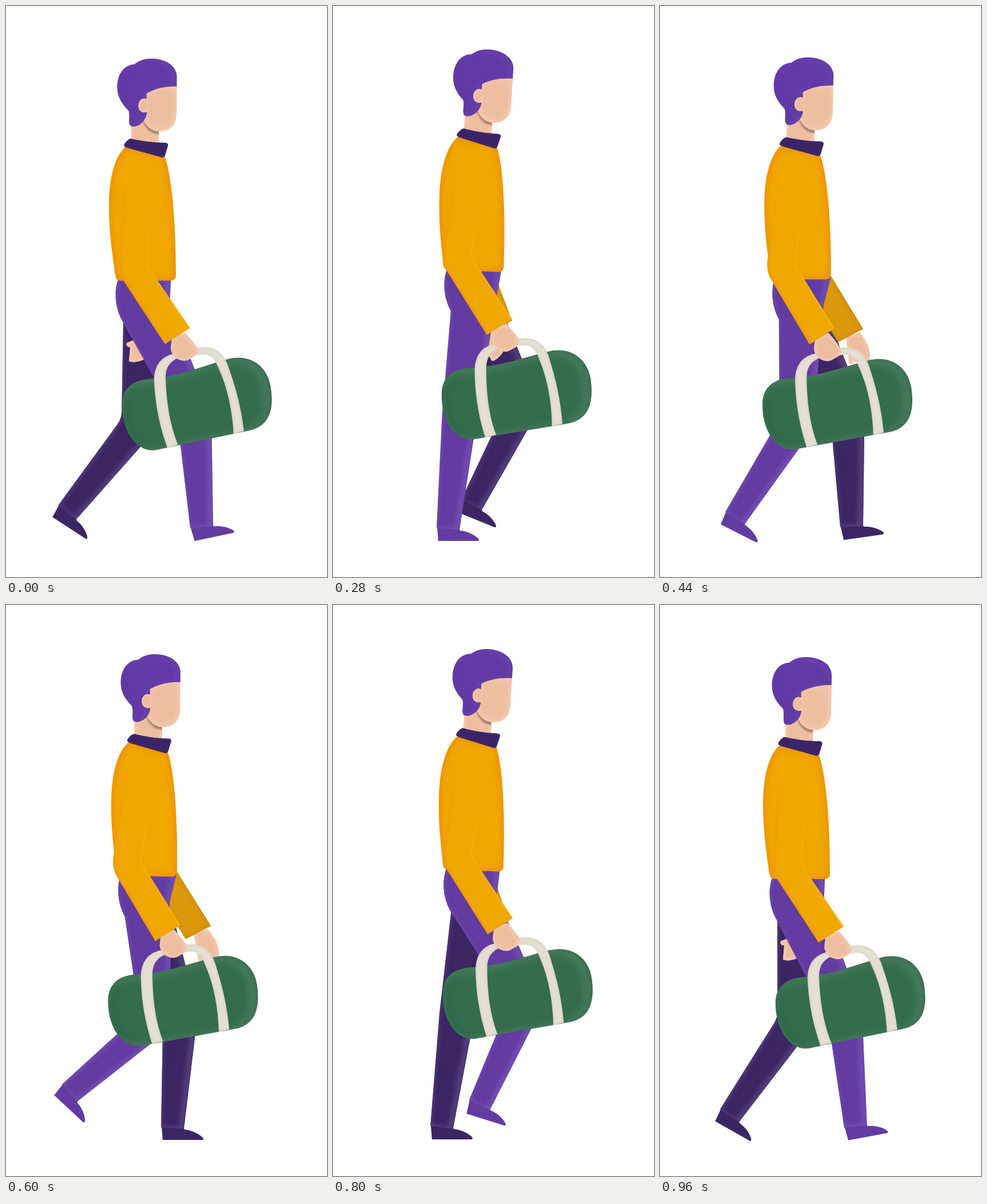
These frames come from a looping animation (561 px wide and 998 px high, 1000 ms). An HTML page with a canvas:

```html
<!DOCTYPE html>
<html lang="en">
<head>
<meta charset="utf-8">
<title>Walk cycle</title>
<style>
html, body { margin: 0; width: 100%; height: 100%; overflow: hidden; background: #fff; }
canvas { display: block; }
</style>
</head>
<body>
<canvas id="stage" width="561" height="998"></canvas>
<script>
const ctx = document.getElementById('stage').getContext('2d');
const LOOP = 1000, STEP = 40, TAU = Math.PI * 2, DEG = Math.PI / 180;
const THIGH = 228, SHIN = 196;

const SKIN = '#edbf9f', SKIN_EDGE = 'rgba(250,205,185,.8)';
const ORANGE = '#f0a700', ORANGE_EDGE = 'rgba(238,132,0,.65)';
const PURPLE = ['#633ba1', 'rgba(100,62,168,.6)', 9, 'rgba(140,108,200,.45)'];
const DARK = ['#3c2563', 'rgba(66,42,108,.6)', 9, 'rgba(118,96,156,.5)'];

const torso = new Path2D('M208 247C188 266 180 305 180 350C180 400 187 440 191 470Q192 480 200 480H288Q297 480 297 470C297 390 291 300 277 262Z');
const collar = new Path2D('M219 232Q214 231 207 241Q204 246 212 248L271 264Q276 266 278 261L283 244Q284 239 277 239C258 239 236 236 219 232Z');
const neck = new Path2D('M219 195H267V245H218Z');
const chin = new Path2D('M236 190C240 212 252 224 268 224V215Z');
const face = new Path2D('M243 150C262 140 280 138 298 139V186C298 210 285 219 268 219C250 219 239 204 237 188Z');
const hair = new Path2D('M245 153C260 144 278 140 298 140V122C297 104 278 92 253 92C241 92 231 96 224 102C205 103 194 120 194 142C194 160 203 172 214 183C217 194 213 203 217 209Q223 213 232 208C240 203 245 196 246 186Z');
const ear = new Path2D('M248 164C239 158 231 165 231 174C231 184 238 188 248 185Z');
const foot = new Path2D('M-2 -25L0 0H69Q73 -1 69 -5C60 -13 49 -17 38 -18L34 -28Z');
const bag = new Path2D('M203 697C203 672 218 655 248 652C300 648 340 631 385 618C425 606 455 628 462 662C469 700 464 734 425 742L262 776C230 781 203 745 203 697Z');
const leftStrap = new Path2D('M298 607C272 611 259 627 259 655C261 700 270 738 282 772L301 767C288 735 281 700 279 650C279 632 286 622 301 615Z');
const rightStrap = new Path2D('M331 598C358 592 378 600 388 628C401 665 411 700 416 743L398 748C396 710 388 668 372 634C363 610 352 606 335 610Z');
const hand = new Path2D('M-10 2C-10 12 -13 20 -11 26Q-8 36 0 40Q10 45 18 42L32 34Q37 28 35 21C30 13 22 4 14 -6Z');
const farHand = new Path2D('M-8 2L-2 48Q4 52 7 44L30 52Q36 46 34 28Q30 10 16 -6Z');

// phase, ankle x, ankle y, foot tilt
const gait = [
  [0, 342, 911, -12], [100, 291, 914, 0], [160, 260, 914, 0], [280, 201, 914, 0],
  [300, 190, 913, 0], [440, 131, 895, 27], [500, 107, 885, 33], [600, 111, 853, 43],
  [660, 134, 852, 40], [780, 242, 872, 22], [800, 256, 874, 17.5], [940, 335, 910, -8]
];

function keyAt(i) {
  const n = gait.length, turn = Math.floor(i / n);
  const k = gait[i - turn * n];
  return [k[0] + turn * LOOP, k[1], k[2], k[3]];
}

// Smooth cyclic interpolation through the gait keys.
function stride(phase) {
  let i = gait.length - 1;
  while (gait[i][0] > phase) i--;
  const [a, b, c, d] = [i - 1, i, i + 1, i + 2].map(keyAt);
  const h = c[0] - b[0], u = (phase - b[0]) / h, u2 = u * u, u3 = u2 * u;
  return [1, 2, 3].map(j => {
    const m0 = (c[j] - a[j]) / (c[0] - a[0]), m1 = (d[j] - b[j]) / (d[0] - b[0]);
    return (2 * u3 - 3 * u2 + 1) * b[j] + (u3 - 2 * u2 + u) * h * m0
      + (3 * u2 - 2 * u3) * c[j] + (u3 - u2) * h * m1;
  });
}

const wave = (t, period, shift = 0) => Math.cos(TAU * (t - shift) / period);

// Fill with a blurred inner edge and an optional highlight from the upper right.
function soft(path, fill, edge, size = 6, glow) {
  ctx.fillStyle = fill;
  ctx.fill(path);
  if (!edge) return;
  ctx.save();
  ctx.clip(path);
  ctx.filter = `blur(${size / 2}px)`;
  ctx.strokeStyle = edge;
  ctx.lineWidth = size;
  ctx.stroke(path);
  if (glow) {
    ctx.translate(-size / 2, size / 4);
    ctx.strokeStyle = glow;
    ctx.stroke(path);
  }
  ctx.restore();
}

function placed(x, y, angle, px, py, draw) {
  ctx.save();
  ctx.translate(x, y);
  ctx.rotate(angle * DEG);
  ctx.translate(-px, -py);
  draw();
  ctx.restore();
}

function poly(points) {
  const p = new Path2D();
  points.forEach(([x, y]) => p.lineTo(x, y));
  p.closePath();
  return p;
}

// Forward-facing unit normal of the segment a-b.
function normal(a, b) {
  const dx = b[0] - a[0], dy = b[1] - a[1], l = Math.hypot(dx, dy);
  return [dy / l, -dx / l];
}

function bendKnee(hip, ankle) {
  const dx = ankle[0] - hip[0], dy = ankle[1] - hip[1];
  const d = Math.hypot(dx, dy);
  const a = (d * d + THIGH * THIGH - SHIN * SHIN) / (2 * d);
  const h = Math.sqrt(Math.max(0, THIGH * THIGH - a * a));
  return [hip[0] + (dx * a + dy * h) / d, hip[1] + (dy * a - dx * h) / d];
}

function leg(phase, hipX, hem, back, front, look) {
  const [ax, ay, tilt] = stride(phase);
  const hip = [hipX, hem + 25], ankle = [ax, ay];
  const knee = bendKnee(hip, ankle);
  const n1 = normal(hip, knee), n2 = normal(knee, ankle);
  const sum = [n1[0] + n2[0], n1[1] + n2[1]], l = Math.hypot(...sum);
  const off = (p, n, w) => [p[0] + n[0] * w, p[1] + n[1] * w];
  const nk = [sum[0] / l, sum[1] / l];
  const kneeBack = off(knee, nk, -30), kneeFront = off(knee, nk, 31);
  const hemBack = off(ankle, n2, -20), hemFront = off(ankle, n2, 20);
  const groin = [286, hem + 45];

  const r = tilt * DEG, c = Math.cos(r), s = Math.sin(r);
  placed(ax - 17 * c - 21 * s, ay - 17 * s + 21 * c, tilt, 0, 0, () => soft(foot, look[0], look[1], 5));

  const p = new Path2D();
  p.moveTo(back + 7, hem - 8);
  p.bezierCurveTo(back - 4, hem + 18, back, hem + 48, back + 12, hem + 70);
  p.arcTo(...kneeBack, ...hemBack, 40);
  p.lineTo(...hemBack);
  p.lineTo(...hemFront);
  p.arcTo(...kneeFront, ...groin, 60);
  p.lineTo(...groin);
  p.lineTo(front, hem);
  p.lineTo(front, hem - 8);
  p.closePath();
  soft(p, ...look);
}

function farArm(t, hem) {
  const x = Math.max(258, 291 - 50 * wave(t, LOOP, 30)), y = hem + 99;
  const elbow = [x / 2 + 110, hem + 6];
  const n = normal(elbow, [x, y]);
  placed(x, y, 334 - x, 0, 0, () => soft(farHand, SKIN, SKIN_EDGE));
  const sleeve = poly([
    [elbow[0] + n[0] * 25, elbow[1] + n[1] * 25], [x + 22, y - 12],
    [x - 22, y + 11], [elbow[0] - n[0] * 25, elbow[1] - n[1] * 25]
  ]);
  soft(sleeve, '#dc980a', 'rgba(196,138,20,.6)', 8);
}

function head() {
  soft(neck, SKIN, SKIN_EDGE);
  ctx.save();
  ctx.clip(neck);
  ctx.filter = 'blur(1.5px)';
  ctx.fillStyle = 'rgba(120,88,70,.6)';
  ctx.fill(chin);
  ctx.restore();
  soft(face, SKIN, SKIN_EDGE, 8);
  soft(hair, '#623aa6', 'rgba(92,52,160,.5)', 8, 'rgba(120,84,186,.4)');
  soft(ear, SKIN, SKIN_EDGE, 3);
}

function luggage() {
  soft(bag, '#336d4d', 'rgba(36,88,60,.6)', 14, 'rgba(120,160,136,.4)');
  soft(leftStrap, '#e5ded2', 'rgba(200,194,184,.5)', 3);
  soft(rightStrap, '#e5ded2', 'rgba(200,194,184,.5)', 3);
}

function nearSleeve(ex, ey, wx, wy, sx, sy) {
  const p = new Path2D();
  p.moveTo(sx - 26, sy);
  p.lineTo(ex - 49, ey - 5);
  p.quadraticCurveTo(ex - 50, ey + 14, ex - 42, ey + 26);
  p.lineTo(wx - 22, wy + 14);
  p.lineTo(wx + 22, wy - 14);
  p.lineTo(ex, ey);
  p.lineTo(sx + 26, sy);
  p.closePath();
  soft(p, ORANGE);

  const fade = (y0, y1, color) => {
    const g = ctx.createLinearGradient(0, y0, 0, y1);
    g.addColorStop(0, `rgba(${color},0)`);
    g.addColorStop(1, `rgba(${color},.6)`);
    return g;
  };
  ctx.save();
  ctx.clip(p);
  ctx.filter = 'blur(2px)';
  ctx.lineWidth = 5;
  ctx.strokeStyle = fade(sy, ey, '236,140,0');
  ctx.beginPath();
  ctx.moveTo(sx - 26, sy);
  ctx.lineTo(ex - 49, ey - 5);
  ctx.quadraticCurveTo(ex - 50, ey + 14, ex - 42, ey + 26);
  ctx.lineTo(wx - 22, wy + 14);
  ctx.stroke();
  ctx.filter = 'blur(1px)';
  ctx.lineWidth = 4;
  ctx.strokeStyle = fade(sy, ey, '248,190,0');
  ctx.beginPath();
  ctx.moveTo(sx + 26, sy);
  ctx.lineTo(ex, ey);
  ctx.lineTo(wx + 22, wy - 14);
  ctx.stroke();
  ctx.restore();
}

function draw(t) {
  const sway = wave(t, LOOP), bounce = wave(t, LOOP / 2);
  const bob = -8.8 * (1 - bounce), hem = 480 + bob;
  const lean = 1.15 * (1 - wave(t, LOOP / 2, -10));
  const nod = 1.75 * (1 - wave(t, LOOP / 2, 40));
  const swing = -12.9 * (1 - wave(t, LOOP, 28));
  const carry = bob * 1.05 + 1.6 * (1 - sway);
  const back = 193.5 - 2.5 * sway, front = 293 - 5 * sway;

  ctx.fillStyle = '#fff';
  ctx.fillRect(0, 0, 561, 998);

  leg((t + LOOP / 2) % LOOP, 245 + 3 * sway, hem, back + 2, front - 3, DARK);
  farArm(t, hem);
  leg(t, 243 - 2 * sway, hem, back, front, PURPLE);

  placed(244 - sway, hem, lean, 243, 480, () => {
    soft(torso, ORANGE, ORANGE_EDGE, 10);
    placed(243, 235, nod - lean, 243, 235, head);
    soft(collar, '#3b2466', 'rgba(66,42,112,.7)', 5);
  });

  const tip = 0.8 * (1 - bounce) + 0.6 * (1 - sway);
  placed(333 + swing, 695 + carry, tip, 333, 695, luggage);

  const wx = 300 + swing * 0.7, wy = 577 + carry;
  placed(wx + swing * 0.1, wy, 0, 0, 0, () => soft(hand, SKIN, SKIN_EDGE));
  const shoulder = 231 + 180 * Math.sin(lean * DEG);
  nearSleeve(248 + swing * 0.48, 455 + bob, wx, wy, shoulder, 300 + bob);
}

function tick() {
  const t = performance.now() % LOOP;
  draw(Math.floor(t / STEP) * STEP);
  requestAnimationFrame(tick);
}
tick();
</script>
</body>
</html>
```
